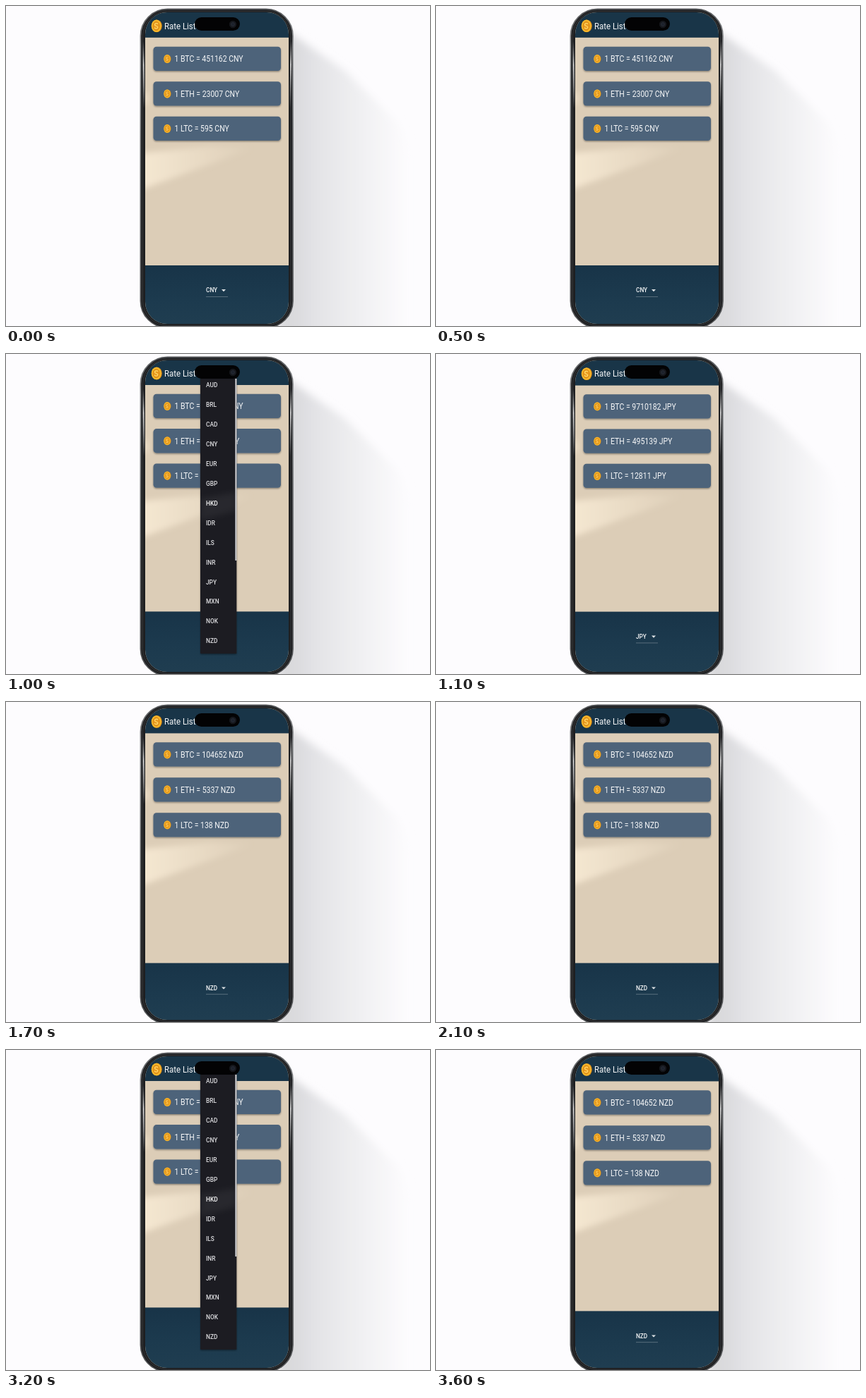
An HTML page for the animation above (3.7 s loop, 600 by 454 pixels).

```html
<!DOCTYPE html>
<html lang="en">
<head>
<meta charset="utf-8">
<title>Currency rates</title>
<style>
html, body { margin: 0; width: 100%; height: 100%; overflow: hidden; background: #fdfcfe; }
svg { display: block; }
text { font-family: Roboto, "Noto Sans", sans-serif; fill: #f6f7f8; }
</style>
</head>
<body>
<svg width="600" height="454" viewBox="0 0 600 454">
  <defs>
    <linearGradient id="cast" gradientUnits="userSpaceOnUse" x1="405" y1="0" x2="570" y2="0">
      <stop offset="0" stop-color="#d9d9dc"/>
      <stop offset=".2" stop-color="#e3e3e6"/>
      <stop offset=".55" stop-color="#efeff1"/>
      <stop offset="1" stop-color="#fdfcfe"/>
    </linearGradient>
    <linearGradient id="rim" x2="0" y2="1">
      <stop offset="0" stop-color="#55575a"/>
      <stop offset=".12" stop-color="#96989a"/>
      <stop offset=".4" stop-color="#6c6e70"/>
      <stop offset="1" stop-color="#505254"/>
    </linearGradient>
    <linearGradient id="foot" x2="0" y2="1">
      <stop offset="0" stop-color="#183448"/>
      <stop offset=".5" stop-color="#1c3a4e"/>
      <stop offset="1" stop-color="#203e51"/>
    </linearGradient>
    <linearGradient id="beam" gradientUnits="userSpaceOnUse" x1="197" y1="0" x2="355" y2="0">
      <stop offset="0" stop-color="#fff2dc" stop-opacity=".7"/>
      <stop offset="1" stop-color="#fff2dc" stop-opacity="0"/>
    </linearGradient>
    <linearGradient id="gleam" x2="0" y2="1">
      <stop offset="0" stop-color="#fff" stop-opacity="0"/>
      <stop offset=".35" stop-color="#fff" stop-opacity=".8"/>
      <stop offset="1" stop-color="#fff" stop-opacity="0"/>
    </linearGradient>
    <filter id="soft" x="-20%" y="-20%" width="140%" height="140%"><feGaussianBlur stdDeviation="6"/></filter>
    <filter id="haze" x="-20%" y="-40%" width="140%" height="180%"><feGaussianBlur stdDeviation="4.5"/></filter>
    <filter id="lift" x="-10%" y="-20%" width="120%" height="160%">
      <feDropShadow dx="0" dy="1.3" stdDeviation="1.2" flood-color="#000" flood-opacity=".4"/>
    </filter>
    <clipPath id="glass"><rect x="197" y="9" width="203" height="442" rx="31"/></clipPath>
    <g id="coin">
      <ellipse cx=".5" rx="7.3" ry="8.9" fill="#dd8f1a"/>
      <ellipse cx="-.4" rx="6.9" ry="8.7" fill="#fabb2c"/>
      <ellipse cx="-.4" rx="4.7" ry="6.3" fill="#e8981d" stroke="#d38316" stroke-width=".8"/>
      <path d="M2-2.6C1-4.2-2.6-4-2.5-1.7S2-.2 1.8 2-2.2 4-3 2.3" fill="none" stroke="#ffd968" stroke-width="1.3"/>
    </g>
  </defs>

  <path d="M385 25L408 42L480 92L556 168L575 215V480H385Z" fill="url(#cast)" filter="url(#soft)"/>
  <rect x="190.4" y="4.4" width="215.6" height="452" rx="38" fill="#1e1f21" stroke="url(#rim)" stroke-width="1.7"/>
  <rect x="193.5" y="7.3" width="209.4" height="446" rx="35" fill="none" stroke="#343537"/>
  <g clip-path="url(#glass)">
    <g id="screen"></g>
    <path d="M190 209L290 199L350 201L290 224L190 261Z" fill="url(#beam)" filter="url(#haze)"/>
    <ellipse cx="197" cy="131" rx="5" ry="10" fill="#fff2dc" opacity=".45" filter="url(#haze)"/>
    <g id="menu"></g>
  </g>
  <path d="M193.5 50H195L196.5 145H194Z" fill="url(#gleam)"/>
  <path d="M402.5 50H404.5L403 145H401.5Z" fill="url(#gleam)"/>
  <rect x="267" y="16" width="64" height="19" rx="9.5" fill="#030304"/>
  <circle cx="321" cy="26" r="5.2" fill="#15171c"/>
  <circle cx="321" cy="26" r="2.6" fill="#1d222c" stroke="#292d36" stroke-width=".8"/>
</svg>
<script>
const LOOP = 3700, SQUEEZE = 0.86; // the screen is narrower than its natural proportions
const CODES = 'AUD BRL CAD CNY EUR GBP HKD IDR ILS INR JPY MXN NOK NZD'.split(' ');
const COINS = ['BTC', 'ETH', 'LTC'];

const cny = { code: 'CNY', rates: [451162, 23007, 595], head: 44.8, top: 57.8, gap: 49.5, foot: 368 };
const list = { ...cny, open: true, head: 44, top: 56.8, gap: 49.3, foot: 365.4 };
const jpy = { code: 'JPY', rates: [9710182, 495139, 12811], head: 44.6, top: 57.2, gap: 49.3, foot: 365.6 };
const nzd = { code: 'NZD', rates: [104652, 5337, 138], head: 44.4, top: 57.2, gap: 50, foot: 370.4 };

// hard cuts: start time and the screen shown from then on
const cuts = [[0, cny], [550, list], [1050, jpy], [1650, nzd],
              [2150, list], [2650, jpy], [3150, list], [3550, nzd]];

const el = id => document.getElementById(id);
const rect = (x, y, w, h, fill, extra = '') =>
  `<rect x="${x}" y="${y}" width="${w}" height="${h}" fill="${fill}" ${extra}/>`;
const label = (x, y, size, str, extra = '') =>
  `<text transform="translate(${x} ${y}) scale(${SQUEEZE} 1)" font-size="${size}" ${extra}>${str}</text>`;
const coin = (x, y, scale) =>
  `<use href="#coin" transform="translate(${x} ${y}) scale(${scale})"/>`;

function card(s, name, i) {
  const y = s.top + i * s.gap;
  return rect(208.5, y, 180.5, 34.3, '#4d637a', 'rx="4.5" filter="url(#lift)"') +
    coin(228.2, y + 17.2, 0.68) +
    label(238.5, y + 21.4, 12.2, `1 ${name} = ${s.rates[i]} ${s.code}`);
}

function picker({ foot, code }) {
  return label(283, foot + 38.3, 9.6, code, 'font-weight="500"') +
    `<path d="M305 ${foot + 34}h6l-3 3.2z" fill="#dfe3e6"/>` +
    rect(283, foot + 44, 31, 0.7, '#71838f');
}

function menu() {
  const items = CODES.map((code, i) =>
    label(283, 47.3 + i * 27.92, 9.7, code, `font-weight="500" style="fill:${code === 'HKD' ? '#fff' : '#dfdfe2'}"`));
  return rect(275, 28, 51.3, 397, '#1c1b21', 'rx="1" filter="url(#lift)"') +
    `<path d="M275 205L326 196V222L275 236Z" fill="#fff" opacity=".05" filter="url(#haze)"/>` +
    items.join('') + rect(324.4, 35, 2, 258, '#d5d5d8');
}

function draw(s) {
  el('screen').innerHTML = rect(190, 0, 220, 460, '#dccdb7') +
    rect(190, 0, 220, s.head, '#193548') +
    coin(213, s.head - 16.5, 1) +
    label(224, s.head - 12.2, 13.3, 'Rate Lister') +
    COINS.map((name, i) => card(s, name, i)).join('') +
    rect(190, s.foot, 220, 460 - s.foot, 'url(#foot)') +
    (s.open ? '' : picker(s));
  el('menu').innerHTML = s.open ? menu() : '';
}

let shown;
function tick() {
  const t = performance.now() % LOOP;
  const scene = cuts.filter(([start]) => start <= t).pop()[1];
  if (scene !== shown) draw(shown = scene);
  requestAnimationFrame(tick);
}
tick();
</script>
</body>
</html>
```
